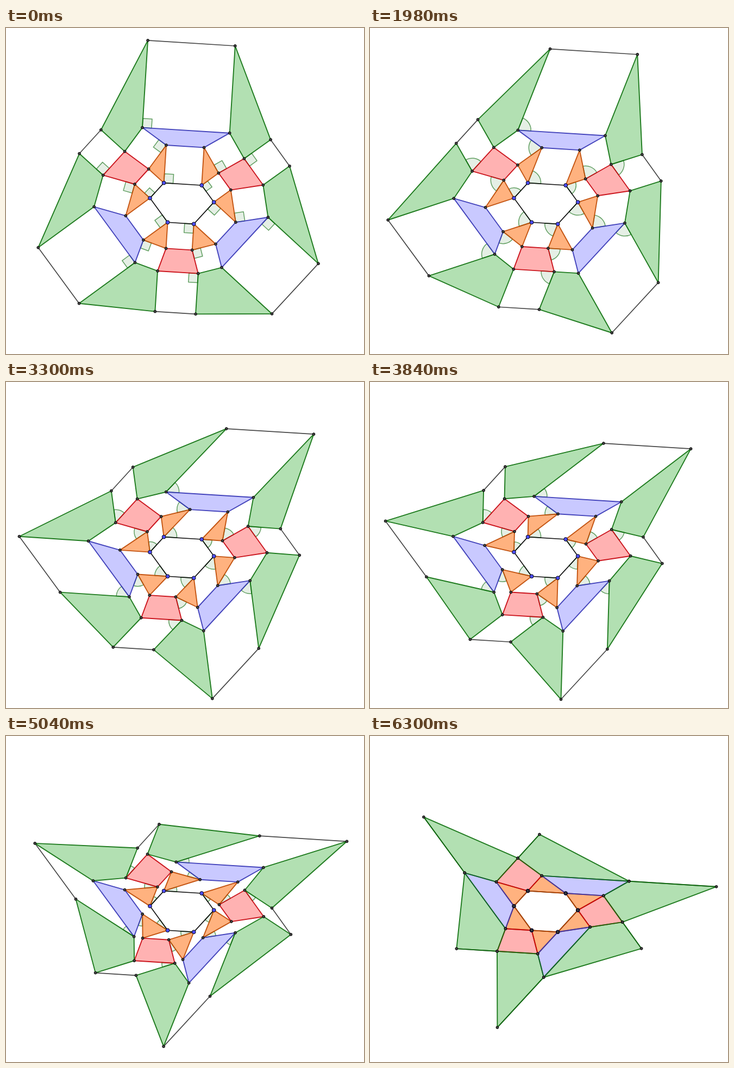
Write an HTML page with a canvas that moves like this. It is 659 px wide and 601 px high and loops after 7560 ms.

```html
<!DOCTYPE html>
<html lang="en">
<head>
<meta charset="utf-8">
<title>Hinged rhombi around a hexagon</title>
<style>
  html, body { margin: 0; width: 100%; height: 100%; overflow: hidden; background: #fff; }
  canvas { display: block; }
</style>
</head>
<body>
<canvas id="stage" width="659" height="601"></canvas>
<script>
const ctx = document.getElementById('stage').getContext('2d');
const LOOP = 7560, HOLD = 960, STEP = 60;
const MARK = 24;

const hex = [
  [290.6, 285.6], [360.2, 290], [382.7, 321.1],
  [345.7, 361.3], [297.6, 358.25], [265, 313.6]
];

const ORANGE = { fill: 'rgba(255,102,0,0.5)', line: 'rgba(190,72,0,0.9)' };
const BLUE = { fill: 'rgba(0,0,255,0.21)', line: 'rgba(50,50,180,0.9)' };
const RED = { fill: 'rgba(255,0,0,0.3)', line: 'rgba(198,0,10,0.9)' };
const GREEN = { fill: 'rgba(0,153,0,0.3)', line: 'rgba(10,110,10,0.9)' };

const add = (p, q) => [p[0] + q[0], p[1] + q[1]];
const sub = (p, q) => [p[0] - q[0], p[1] - q[1]];
const next = i => (i + 1) % 6;
const prev = i => (i + 5) % 6;

function turn([x, y], a) {
  const c = Math.cos(a), s = Math.sin(a);
  return [x * c - y * s, x * s + y * c];
}

function trace(points) {
  ctx.beginPath();
  points.forEach(p => ctx.lineTo(p[0], p[1]));
}

function outline(points, color, width) {
  trace(points);
  ctx.closePath();
  ctx.strokeStyle = color;
  ctx.lineWidth = width;
  ctx.stroke();
}

function dot([x, y], radius, fill) {
  ctx.beginPath();
  ctx.arc(x, y, radius, 0, 2 * Math.PI);
  ctx.fillStyle = fill;
  ctx.fill();
  ctx.strokeStyle = '#000';
  ctx.lineWidth = 1;
  ctx.stroke();
}

// Angle marker at a corner, swept from one leg by a signed angle
function mark(corner, leg, sweep, square) {
  const length = Math.hypot(...leg);
  const radius = Math.min(MARK, length / 2);
  if (square) {
    const k = radius * Math.SQRT1_2 / length;
    const u = [leg[0] * k, leg[1] * k];
    const v = turn(u, sweep);
    trace([corner, add(corner, u), add(add(corner, u), v), add(corner, v)]);
  } else {
    const from = Math.atan2(leg[1], leg[0]);
    ctx.beginPath();
    ctx.moveTo(...corner);
    ctx.arc(...corner, radius, from, from + sweep, sweep < 0);
  }
  ctx.closePath();
  ctx.fillStyle = 'rgba(0,100,0,0.1)';
  ctx.fill();
  ctx.strokeStyle = 'rgba(0,100,0,0.6)';
  ctx.lineWidth = 1.5;
  ctx.stroke();
}

function build(a) {
  const marks = [];
  const p1 = [], q1 = [], p2 = [], q2 = [], p3 = [], q3 = [];

  // Rhombi on the hexagon sides
  hex.forEach((h, i) => {
    const side = sub(hex[next(i)], h);
    const r = turn(side, -a);
    q1[i] = add(h, r);
    p1[next(i)] = add(hex[next(i)], r);
    marks.push([h, side, -a]);
  });
  // Rhombi on the triangles, hinged the other way
  hex.forEach((h, i) => {
    const side = sub(p1[i], q1[i]);
    const r = turn(side, a);
    q2[i] = add(q1[i], r);
    p2[i] = add(p1[i], r);
    marks.push([q1[i], side, a]);
  });
  // Rhombi on the trapezoids
  hex.forEach((h, i) => {
    const j = next(i);
    const side = sub(p2[j], q2[i]);
    const r = turn(side, -a);
    q3[i] = add(q2[i], r);
    p3[j] = add(p2[j], r);
    marks.push([q2[i], side, -a]);
  });

  const shapes = [
    ...hex.map((h, i) => [ORANGE, [h, p1[i], q1[i]]]),
    ...hex.map((h, i) => {
      const j = next(i);
      return [i % 2 ? RED : BLUE, [q1[i], p1[j], p2[j], q2[i]]];
    }),
    ...hex.map((h, i) => [GREEN, [p2[i], q2[i], q3[i], p3[i]]])
  ];
  const rim = hex.map((h, i) => [q3[i], p3[next(i)]]);
  return { marks, shapes, rim, joints: [...p1, ...q1, ...p2, ...q2, ...p3, ...q3] };
}

function draw(degrees) {
  const { marks, shapes, rim, joints } = build(degrees * Math.PI / 180);
  ctx.fillStyle = '#fff';
  ctx.fillRect(0, 0, 659, 601);
  ctx.lineJoin = 'round';

  for (const [style, points] of shapes) {
    trace(points);
    ctx.fillStyle = style.fill;
    ctx.fill();
  }
  if (degrees > 0) marks.forEach(m => mark(...m, degrees === 90));
  outline(hex, 'rgba(0,0,0,0.92)', 1.7);
  rim.forEach(edge => outline(edge, 'rgba(0,0,0,0.72)', 1.7));
  shapes.forEach(([style, points]) => outline(points, style.line, 1.9));

  hex.forEach(h => dot(h, 3.4, '#4d4dff'));
  joints.forEach(j => dot(j, 2.4, '#444'));
}

function frame(now) {
  const t = now % LOOP;
  const steps = Math.floor((t - HOLD) / STEP) + 1;
  draw(90 - Math.max(0, Math.min(90, steps)));
  requestAnimationFrame(frame);
}

const start = performance.now();
const run = () => frame(Math.max(0, performance.now() - start));
(function loop() {
  const t = Math.max(0, performance.now() - start) % LOOP;
  const steps = Math.floor((t - HOLD) / STEP) + 1;
  draw(90 - Math.max(0, Math.min(90, steps)));
  requestAnimationFrame(loop);
})();
</script>
</body>
</html>
```
